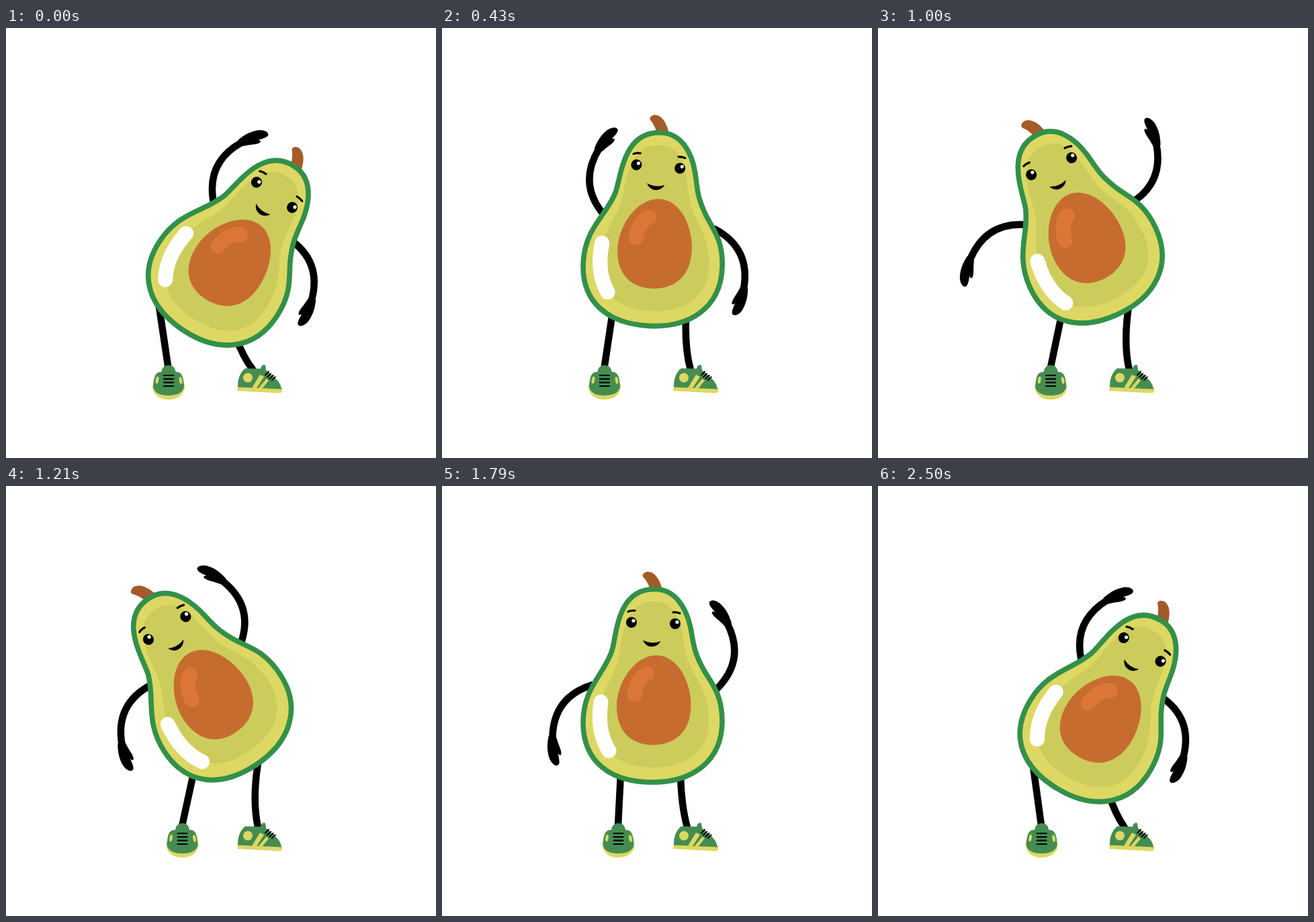
An HTML page for the animation above (2570 ms loop, 640 by 640 pixels).

```html
<!DOCTYPE html>
<html>
<head>
<meta charset="utf-8">
<title>Dancing avocado</title>
<style>
  html, body { margin: 0; height: 100%; overflow: hidden; background: #fff; }
  svg { display: block; width: 100vw; height: 100vh; }
  .limb { fill: none; stroke: #000; stroke-width: 10.5; stroke-linecap: round; }
  .line { fill: none; stroke: #000; stroke-width: 2.2; stroke-linecap: round; }
  .green { fill: #458c51; }
  .yellow { fill: #ddd863; }
</style>
</head>
<body>
<svg viewBox="0 0 640 640">
  <defs>
    <path id="hand" d="M-4-5.2C8-10 18-12 30-10C38-8 43-3 41 1C39 4 32 4 24 3.5Q28 5 27 7.5C24 10 16 8 10 7L-4 5.2Z"/>
  </defs>

  <path id="legL" class="limb"/>
  <path id="legR" class="limb"/>
  <path id="armL" class="limb"/>
  <use id="handL" href="#hand"/>
  <path id="armR" class="limb"/>
  <use id="handR" href="#hand"/>

  <g id="shoe">
    <path class="yellow" d="M-24 531C-25 545-14 553 0 553C14 553 25 545 24 531Z"/>
    <path class="green" d="M-12 512C-20 512-22 520-23 532C-23 543-12 547 0 547C12 547 23 543 23 532C22 520 20 512 12 512Z"/>
    <path class="green" d="M-11 514C-10 505-6 502 0 502C6 502 10 505 11 514Z"/>
    <path class="line" d="M-7 517H7M-7 522.3H7M-7 527.6H7M-7 533H7"/>
    <ellipse class="yellow" cx="-17" cy="524" rx="2.2" ry="5.3" transform="rotate(10 -17 524)"/>
    <ellipse class="yellow" cx="18" cy="524.5" rx="2.2" ry="5.3" transform="rotate(-10 18 524.5)"/>
  </g>

  <path class="yellow" d="M345 533L411 536Q413 543 407 543.5L344 540Z"/>
  <path class="green" d="M345 534.5C345 522 348 513 356 506.5L379 507C380 502 383 500 386 502L387 509C394 517 409 524 410 537.5Z"/>
  <circle class="yellow" cx="360" cy="520.5" r="7"/>
  <path class="yellow" d="M378 516L384 519L373 536L366 535.5ZM387.5 522L391 524.5L381 537L375.5 536.5Z"/>
  <path class="line" d="M391 511.5L386 516.5M394 514.5L389 519.5M397.5 517L392.5 522M400.5 519.5L396 524"/>

  <g id="body">
    <path fill="#a55b28" d="M310 154Q306 142 299 135Q297 130 305 127.5C316 127 324 138 328 154Z"/>
    <path fill="#ddd863" stroke="#339049" stroke-width="7.6" d="M316 153.5C345 153 363 178 370 211C375 238 375 245 386 267C397 290 417 305 417 350C417 410 372 441 313 441C250 441 210 410 210 352C210 300 241 281 253 245C260 222 260 153.5 316 153.5Z"/>
    <path fill="#cccc5c" d="M316 172C340 172 352 190 357 215C362 240 362 255 371 272C383 295 397 310 397 350C397 395 365 419 313 419C262 419 233 392 233 350C233 305 255 290 263 255C269 225 270 172 316 172Z"/>
    <path fill="#c66c2f" d="M319 252C350 252 370 290 370.5 325C371 362 350 385 314 385.5C278 385 260 362 260 328C260 292 287 252 319 252Z"/>
    <g fill="none" stroke-width="22" stroke-linecap="round">
      <path stroke="#dc7636" d="M305 279.5Q290 286 286.5 311"/>
      <path stroke="#fff" d="M236.5 321.5Q230 365 248.5 394"/>
    </g>
    <circle cx="282" cy="203" r="8"/>
    <circle cx="347" cy="205" r="8"/>
    <circle cx="285" cy="200.5" r="2.6" fill="#fff"/>
    <circle cx="350" cy="202.5" r="2.6" fill="#fff"/>
    <path class="line" style="stroke-width:3.2" d="M277 187Q281 185 287 185.5M344 188Q349 187.5 354 189.5"/>
    <path d="M299 229.5Q312 236 325.5 231Q321 239 312 239Q303 239 299 229.5Z"/>
  </g>
</svg>

<script>
const LOOP = 2570, STEPS = 36;
const $ = id => document.getElementById(id);
const set = (id, name, value) => $(id).setAttribute(name, value);
const clamp = (v, lo, hi) => Math.min(hi, Math.max(lo, v));
const mix = (a, b, u) => a.map((v, i) => v + (b[i] - v) * u);
const part = (t, from, to) => clamp((t - from) / (to - from), 0, 1);
const ease = (t, from, to) => {
  const u = part(t, from, to);
  return u * u * (3 - 2 * u);
};
const glide = (t, from, to) => 1 - (1 - part(t, from, to)) ** 1.22;

// Each pose is shoulder x, shoulder y and arm angle, upright and at full lean.
const arms = {
  L: { sign: 1, up: [236, 281, 262], upLean: [309, 260, 295], down: [224, 296, 127], downLean: [216, 296, 116] },
  R: { sign: -1, up: [409, 302, -81], upLean: [349, 236, -106], down: [405, 298, 64], downLean: [420, 313, 69.5] }
};

function drawArm(side, lean, raise) {
  const { sign, up, upLean, down, downLean } = arms[side];
  const high = mix(up, upLean, Math.max(0, lean * sign));
  const low = mix(down, downLean, Math.max(0, -lean * sign));
  const [x, y, angle] = mix(low, high, raise);

  // The elbow and hand flip over while the arm passes the horizontal.
  const flip = clamp(3 * (2 * raise - 1), -1, 1) * sign;
  const reach = 89 + 10 * flip * flip, bend = 36 * flip;
  const a = angle * Math.PI / 180, dx = Math.cos(a), dy = Math.sin(a);
  const wx = x + reach * dx, wy = y + reach * dy;
  const cx = (x + wx) / 2 + bend * dy, cy = (y + wy) / 2 - bend * dx;
  set('arm' + side, 'd', `M${x} ${y}Q${cx} ${cy} ${wx} ${wy}`);
  set('hand' + side, 'transform', `translate(${wx} ${wy}) rotate(${angle + 48 * flip}) scale(1 ${flip})`);
}

function draw(now) {
  const t = Math.floor(((now % LOOP) + 5) * STEPS / LOOP) % STEPS;
  const back = glide(t, 28, 36);
  const lean = 1 - ease(t, 0, 7.3) - ease(t, 8, 17) + ease(t, 18, 25) + back;
  const step = ease(t, 8, 17) - back;
  const raise = 1 - ease(t, 8, 16.5) + ease(t, 28, 32);
  const sway = (right, left) => lean * (lean > 0 ? right : left);

  set('body', 'transform', `translate(${315 + sway(20, 10)} ${319 + sway(28, 9.5)})
    rotate(${33.4 * lean}) scale(1 ${1 + 0.025 * Math.abs(lean)}) translate(-315 -319)`);

  const foot = 242 + 20.5 * step;
  const hipY = 428 + 32 * lean;
  set('shoe', 'transform', `translate(${foot} 0)`);
  set('legL', 'd', `M${256 + 10 * step - sway(30, 13)} ${428 - sway(26, 0)}L${foot - 0.5} 506`);
  set('legR', 'd', `M${365 - 10 * step - 23 * lean} ${hipY}
    Q${362 - 6 * step - 9 * lean} ${0.45 * hipY + 283} ${370 - 5 * step - sway(3, 10)} 508`);

  drawArm('L', lean, raise);
  drawArm('R', lean, 1 - raise);
}

const start = performance.now();
function tick() {
  draw(performance.now() - start);
  requestAnimationFrame(tick);
}
tick();
</script>
</body>
</html>
```
